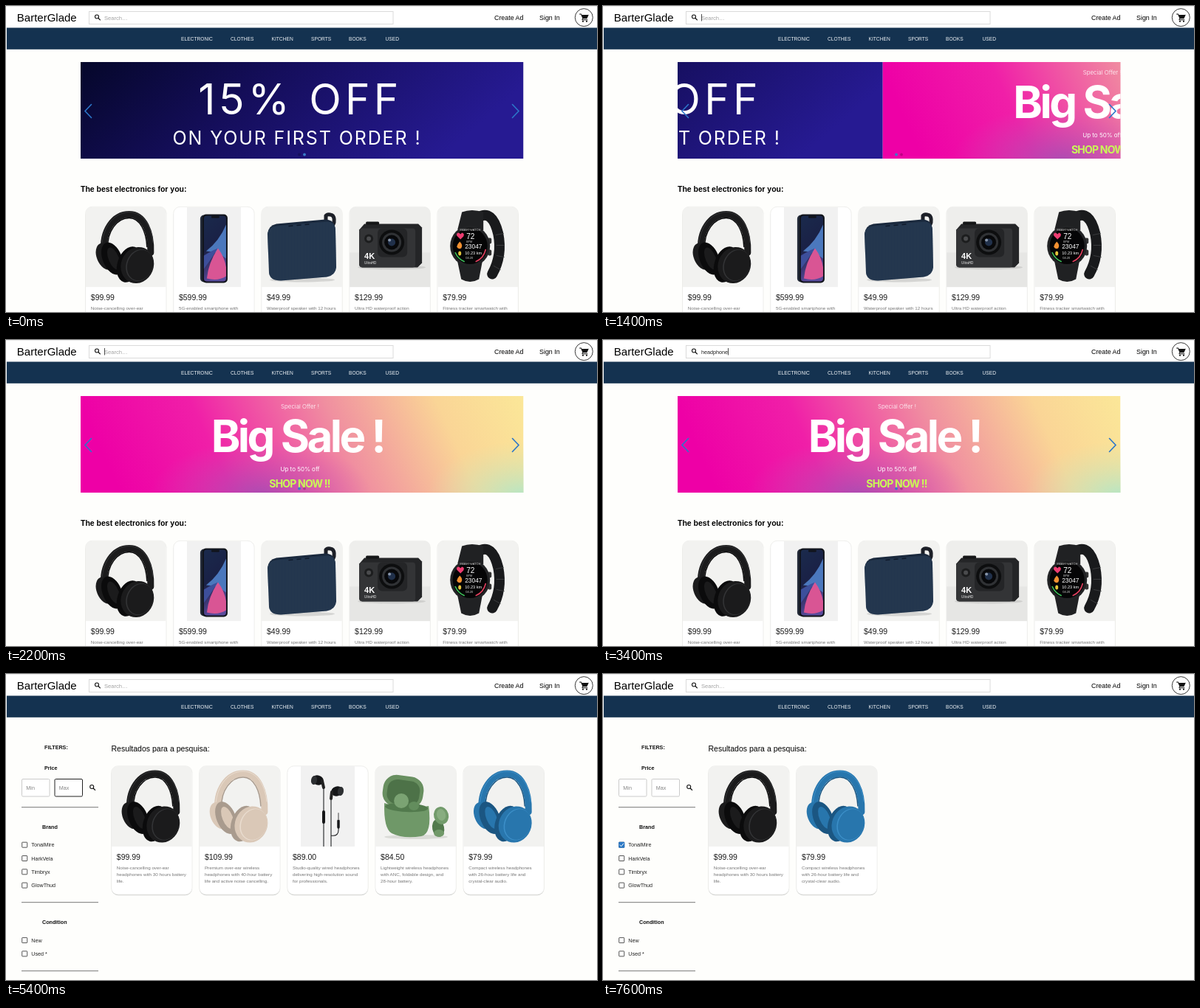
These frames come from a looping animation (800 px wide and 415 px high, 8 s). An HTML page:

```html
<!DOCTYPE html>
<html lang="en">
<head>
<meta charset="utf-8">
<title>BarterGlade</title>
<style>
  html, body { margin: 0; width: 100%; height: 100%; overflow: hidden; background: #fefefc; }
  svg { display: block; font-family: "Liberation Sans", Arial, sans-serif; }
  .banner text { font-family: Inter, sans-serif; fill: #fff; text-anchor: middle; }
  .desc { fill: #777; font-size: 6.25px; }
  .bold { font-weight: bold; }
</style>
</head>
<body>
<svg id="stage" width="800" height="415" viewBox="0 0 800 415"></svg>
<script>
const LOOP = 8000;
const BANNER = 599.5;
const stage = document.getElementById('stage');

// Markup helpers
const text = (x, y, size, str, extra = '') =>
  `<text x="${x}" y="${y}" font-size="${size}" ${extra}>${str}</text>`;
const rect = (x, y, w, h, fill, extra = '') =>
  `<rect x="${x}" y="${y}" width="${w}" height="${h}" fill="${fill}" ${extra}/>`;
const ellipse = (x, y, rx, ry, fill, turn = 0) =>
  `<ellipse cx="${x}" cy="${y}" rx="${rx}" ry="${ry}" fill="${fill}" transform="rotate(${turn} ${x} ${y})"/>`;
const line = (d, stroke, width) =>
  `<path d="${d}" fill="none" stroke="${stroke}" stroke-width="${width}" stroke-linecap="round"/>`;
const shape = (d, fill) => `<path d="${d}" fill="${fill}"/>`;
const group = (id, body) => `<g id="${id}">${body}</g>`;
const gradient = (id, stops, dir) => `<linearGradient id="${id}" ${dir}>` +
  stops.map(([at, color]) => `<stop offset="${at}" stop-color="${color}"/>`).join('') + '</linearGradient>';
const magnifier = (x, y) =>
  `<circle cx="${x - 1}" cy="${y - 1}" r="2.5" fill="none" stroke="#111" stroke-width="1.1"/>` +
  line(`M${x + 1} ${y + 1}l2.4 2.4`, '#111', 1.3);

// Product pictures, each in a 109 x 109 box
const backdrop = rect(0, 0, 109, 109, '#f2f2f0');
const strip = rect(18, 0, 73, 109, '#f1f1f1');

const headphones = (body, dark, light) => backdrop +
  line('M25 62C22 32 38 10 59 10C79 10 89 34 88 62', body, 9) +
  line('M22 58C21 30 37 7 59 7C78 7 89 26 91 48', light, 1) +
  line('M30 55C29 34 42 15 59 15C74 15 82 34 83 54', dark, 1.5) +
  ellipse(27, 67, 12, 19, body, -22) +
  ellipse(36, 70, 13, 23, dark, -22) +
  ellipse(38, 70, 7, 16, body, -22) +
  ellipse(59, 78, 16, 25, dark, 18) +
  ellipse(70, 79, 22, 25, body, 22) +
  ellipse(73, 79, 18, 22, light, 22) +
  ellipse(73.8, 79, 17.2, 21.3, body, 22);

const phone = strip +
  rect(36, 11, 34, 91, '#232a38', 'rx="5"') +
  rect(39, 10, 34, 93, '#10131a', 'rx="5"') +
  rect(41, 12, 30, 89, 'url(#screen)', 'rx="4"') +
  shape('M71 24Q62 46 44 60Q60 60 71 70Z', '#4b78bd') +
  shape('M41 66Q54 58 60 56Q50 72 41 84Z', '#3d4f9b') +
  shape('M60 56Q69 68 71 82V94Q60 101 45 97Q47 76 60 56Z', '#d95594') +
  rect(51, 12, 11, 3, '#10131a', 'rx="1.5"');

const speakerFront = 'M8 37Q9 27 20 26L88 20Q99 20 100 31L101 82Q100 93 88 95L26 100Q11 100 10 89Z';
const speaker = backdrop +
  line('M87 20L87 12Q89 9 95 11Q99 13 98 21L96 26', '#1c1f27', 5) +
  ellipse(55, 99, 44, 3, '#d5d5d3') +
  shape('M8 37Q9 25 20 23L86 17Q99 17 100 31L50 50Z', '#1a293d') +
  shape(speakerFront, '#263a52') + shape(speakerFront, 'url(#mesh)') +
  line('M37 26l5 -.5M48 25l5 -.5M59 24l5 -.5', '#0f1a2b', 1.4);

const camera = rect(0, 0, 109, 109, '#eeeeec') + rect(0, 62, 109, 47, '#e6e6e4') +
  ellipse(57, 82, 46, 3, '#cfcfcd') +
  shape('M13 31L20 23H93L98 28V76L92 82H17L13 79Z', '#242527') +
  rect(13, 29, 76, 53, '#333436', 'rx="4"') +
  rect(22, 20, 18, 4, '#151617', 'rx="1.5"') +
  rect(38, 29, 40, 39, '#242527', 'rx="6"') +
  ellipse(57, 48, 17, 17, '#0d0e0f') + ellipse(57, 48, 13, 13, '#303235') +
  ellipse(57, 48, 10, 10, '#08090b') + ellipse(57, 48, 5, 5, '#20304a') +
  ellipse(54, 45, 2, 2, '#8795aa') +
  ellipse(26, 43, 6, 6, '#1c1d1e') + ellipse(26, 43, 3, 3, '#4a4b4d') +
  text(20, 70, 11, '4K', 'fill="#fff" class="bold"') +
  text(20, 77, 4.6, 'UltraHD', 'fill="#eee"');

const watch = backdrop +
  line('M55 14Q74 3 82 36Q88 66 74 91', '#191a1c', 14) +
  line('M79 38l10 -2M80 52l10 0M80 66l10 2M76 80l9 5', '#3a3b3d', 1) +
  shape('M27 31L33 7Q46 2 62 7L62 32Z', '#202123') +
  shape('M27 74L32 98Q44 105 56 98L61 72Z', '#202123') +
  rect(68, 42, 5, 8, '#333', 'rx="2"') + rect(68, 58, 5, 8, '#333', 'rx="2"') +
  ellipse(44, 53, 27, 28, '#222325') + ellipse(44, 53, 23.5, 24.5, '#050506') +
  line('M24 62A22 23 0 0 0 36 74', '#3ec45b', 1.6) +
  line('M52 74A22 23 0 0 0 65 58', '#e3405f', 1.6) +
  text(44, 32, 4, 'SMARTWATCH', 'fill="#ddd" text-anchor="middle"') +
  text(39, 43, 10, '72', 'fill="#fff"') + text(39, 48, 3.6, 'BPM', 'fill="#ddd"') +
  text(37, 56.5, 8.4, '23047', 'fill="#fff"') + text(37, 64, 5.6, '10.23 km', 'fill="#fff"') +
  text(38, 70, 4, '04.20', 'fill="#ddd"') +
  shape('M31 44L26 39Q25 35 29 35L31 37L33 35Q37 36 35 40Z', '#ee3d72') +
  shape('M30 47Q35 52 32 56Q28 58 26 54Q27 50 30 47Z', '#f39131') +
  ellipse(30, 63, 2, 3, '#e5c63b');

const wired = strip +
  line('M49 25V109M59 40V109M59 94Q70 96 69 84', '#202124', 1.1) +
  line('M69 74V83', '#17181a', 3.5) + line('M69 64V72', '#999', 2) +
  line('M49 62V76', '#151618', 4) +
  [[41, 19], [67, 34]].map(([x, y], i) =>
    ellipse(x, y, 8, 6.5, '#151618', i ? -15 : 15) +
    ellipse(x + (i ? 5 : -5), y, 4, 6, '#2d2f32', 10) +
    line(`M${x + (i ? -7 : 6)} ${y + 1}l${i ? -1 : 2} 9`, '#222', 4)).join('');

const earbuds = backdrop +
  ellipse(55, 96, 43, 3, '#dadbd7') +
  rect(10, 13, 55, 43, '#688f60', 'rx="18" transform="rotate(8 37 34)"') +
  rect(16, 19, 44, 33, '#4d7248', 'rx="13" transform="rotate(8 37 34)"') +
  shape('M12 50Q42 60 72 54Q77 92 62 95Q38 99 22 91Q11 85 12 50Z', '#6f9868') +
  ellipse(42, 56, 29, 6, '#527a4d', 3) +
  ellipse(35, 47, 10, 10, '#7ba373') + ellipse(52, 54, 7, 6, '#638d5d') +
  ellipse(85, 84, 8, 12, '#527a4d', -12) + ellipse(89, 67, 10, 12, '#729b6b', -15) +
  ellipse(89, 66, 6, 8, '#88ad80', -15) + ellipse(86, 91, 7, 5, '#719969');

const black = headphones('#1b1b1c', '#0b0b0c', '#333436');
const sand = headphones('#dac8b7', '#a99b8e', '#e9dccf');
const blue = headphones('#2876ad', '#1b5682', '#3c8fc8');

const card = (x, y, [picture, price, ...lines]) =>
  `<g transform="translate(${x} ${y})">` +
  rect(0, 1.2, 109, 174, '#c9cbc9', 'rx="9"') +
  rect(-.2, -.2, 109.4, 174.4, '#fff', 'rx="9" stroke="#e2e2e0" stroke-width=".6"') +
  `<g clip-path="url(#photo)">${picture}</g>` +
  text(7, 126.5, 10.5, price, 'fill="#1c1c1c"') +
  lines.map((str, i) => text(7, 139.5 + 9 * i, 6.25, str, 'class="desc"')).join('') + '</g>';
const cards = (x, y, list) => list.map((item, i) => card(x + 119.1 * i, y, item)).join('');

const blackItem = [black, '$99.99', 'Noise-cancelling over-ear', 'headphones with 30 hours battery', 'life.'];
const blueItem = [blue, '$79.99', 'Compact wireless headphones', 'with 26-hour battery life and', 'crystal-clear audio.'];
const featured = [
  blackItem,
  [phone, '$599.99', '5G-enabled smartphone with'],
  [speaker, '$49.99', 'Waterproof speaker with 12 hours'],
  [camera, '$129.99', 'Ultra HD waterproof action'],
  [watch, '$79.99', 'Fitness tracker smartwatch with'],
];
const found = [
  blackItem,
  [sand, '$109.99', 'Premium over-ear wireless', 'headphones with 40-hour battery', 'life and active noise cancelling.'],
  [wired, '$89.00', 'Studio-quality wired headphones', 'delivering high-resolution sound', 'for professionals.'],
  [earbuds, '$84.50', 'Lightweight wireless headphones', 'with ANC, foldable design, and', '28-hour battery.'],
  blueItem,
];

const defs = '<defs>' +
  gradient('night', [[0, '#05072a'], [.45, '#150e5c'], [1, '#261a92']], 'x1="0" y1="0" x2="1" y2=".25"') +
  gradient('sunset', [[0, '#ee00a6'], [.25, '#f01fa8'], [.55, '#f08fa0'], [.8, '#fad596'], [1, '#fbe798']], 'x1="0" y1=".1" x2="1" y2="0"') +
  gradient('screen', [[0, '#1a2a4c'], [.5, '#1a2146'], [1, '#5a4b9c']], 'x1="0" y1="0" x2=".3" y2="1"') +
  '<radialGradient id="violet"><stop stop-color="#a050b4" stop-opacity=".85"/><stop offset="1" stop-color="#c850b0" stop-opacity="0"/></radialGradient>' +
  '<radialGradient id="mint"><stop stop-color="#b4e6c6"/><stop offset="1" stop-color="#d8e4b0" stop-opacity="0"/></radialGradient>' +
  '<pattern id="mesh" width="2" height="2" patternUnits="userSpaceOnUse"><rect width="1" height="1" fill="#1c2c42"/></pattern>' +
  `<clipPath id="frame"><rect x="101" y="76" width="${BANNER}" height="131"/></clipPath>` +
  '<clipPath id="photo"><path d="M0 109V9Q0 0 9 0H100Q109 0 109 9V109Z"/></clipPath></defs>';

const header = rect(0, 0, 800, 29.5, '#fff') + rect(0, 0, 800, 1, '#ececec') +
  text(14.8, 21, 15, 'BarterGlade') +
  rect(112.5, 7.5, 411.5, 17, '#fff', 'stroke="#dadada"') + magnifier(124, 15.5) +
  text(133, 18.6, 7.6, 'Search…', 'id="hint" fill="#a2a2a2"') +
  text(133, 18.6, 7.2, '', 'id="query" fill="#222"') +
  rect(133, 11, .8, 9.5, '#222', 'id="caret"') +
  text(661, 19, 8.9, 'Create Ad') + text(722, 19, 8.9, 'Sign In') +
  '<circle cx="782.3" cy="15.6" r="12" fill="#fff" stroke="#222" stroke-width=".9"/>' +
  line('M776.5 11H778.5L781 16.8H786L788 12.3', '#111', 1.1) +
  shape('M778.8 12H788.3L786 16.8H781Z', '#111') + line('M780.8 17L779.8 18.8H787', '#111', 1) +
  ellipse(781, 20.8, 1.1, 1.1, '#111') + ellipse(786, 20.8, 1.1, 1.1, '#111') +
  rect(1, 29.5, 799, 29.3, '#143250') +
  [[237, 'ELECTRONIC'], [304, 'CLOTHES'], [359.5, 'KITCHEN'], [413, 'SPORTS'], [464, 'BOOKS'], [513.5, 'USED']]
    .map(([x, str]) => text(x, 46.6, 6.67, str, 'fill="#eef2f5"')).join('');

const orderSlide = rect(101, 76, BANNER, 131, 'url(#night)') +
  text(398.5, 147, 57, '15% OFF', 'font-weight="400" letter-spacing="5.2"') +
  text(394, 187.8, 25, 'ON YOUR FIRST ORDER !', 'font-weight="400" letter-spacing="1.9"');
const saleSlide = rect(101, 76, BANNER, 131, 'url(#sunset)') +
  ellipse(345, 210, 150, 75, 'url(#violet)') + ellipse(700, 212, 130, 75, 'url(#mint)') +
  text(398, 93, 7.9, 'Special Offer !', 'font-weight="300"') +
  text(394.5, 151.5, 60, 'Big Sale !', 'font-weight="700" letter-spacing="-3.5"') +
  text(398, 178, 8, 'Up to 50% off') +
  text(397.5, 200.3, 14, 'SHOP NOW !!', 'font-weight="700" letter-spacing="-.8" style="fill:#c9fb55"');

const home = `<g class="banner" clip-path="url(#frame)">${group('order', orderSlide)}${group('sale', saleSlide)}</g>` +
  line('M115.5 133.5L107 142.5L115.5 151.5M685.5 133.5L694 142.5L685.5 151.5', '#2b76c9', 1.6) +
  '<circle cx="397" cy="201.5" r="1.9"/><circle cx="404" cy="201.5" r="1.9"/>' +
  text(101, 252, 10.5, 'The best electronics for you:', 'class="bold"') +
  cards(107.8, 272.5, featured);

const field = (x, str, id) => rect(x, 142.5, 37.5, 23.5, '#fff', `id="${id}" rx="1.5" stroke="#cbcbcb"`) +
  text(x + 5.8, 157, 7.2, str, 'fill="#858585"');
const option = (y, str) => rect(21.7, y - 3.6, 7, 7, '#fff', 'rx=".5" stroke="#555" stroke-width="1"') +
  text(34.3, y + 2.6, 7.2, str, 'fill="#222"');
const title = (x, y, str) => text(x, y, 7.2, str, 'class="bold" fill="#111"');

const results = title(52, 101.5, 'FILTERS:') + title(52, 129.5, 'Price') +
  field(21.5, 'Min', 'min') + field(66, 'Max', 'max') + magnifier(117.2, 154) +
  [180.7, 309.7, 402.7].map(y => rect(21, y - .5, 104, 1, '#777')).join('') +
  title(49, 209.7, 'Brand') +
  ['TonalMire', 'HarkVela', 'Timbryx', 'GlowThud'].map((str, i) => option(231.8 + 18.3 * i, str)).join('') +
  group('tick', rect(21.2, 227.8, 8, 8, '#2b78c5', 'rx=".8"') + line('M22.8 231.9L24.6 233.7L27.8 229.9', '#fff', 1)) +
  title(49, 339, 'Condition') + option(361.2, 'New') + option(379.5, 'Used *') +
  text(142.5, 104.5, 10.5, 'Resultados para a pesquisa:') +
  group('all', cards(142.8, 125, found)) + group('filtered', cards(142.8, 125, [blackItem, blueItem]));

stage.innerHTML = defs + rect(0, 0, 800, 415, '#fefefc') + group('home', home) + group('results', results) + header;

const el = id => document.getElementById(id);
const show = (id, on) => el(id).setAttribute('display', on ? 'inline' : 'none');
const dots = el('home').querySelectorAll(':scope > circle');

// The CSS "ease" curve, cubic-bezier(.25, .1, .25, 1)
function ease(p) {
  if (p <= 0 || p >= 1) return p <= 0 ? 0 : 1;
  const curve = (s, a, b) => 3 * s * (1 - s) * ((1 - s) * a + s * b) + s ** 3;
  let low = 0, high = 1;
  for (let i = 0; i < 20; i++) {
    const mid = (low + high) / 2;
    if (curve(mid, .25, .25) < p) low = mid; else high = mid;
  }
  return curve(low, .1, 1);
}

const keys = [[2900, 2], [3000, 3], [3100, 5], [3200, 7], [3400, 9], [3600, 10]];

function draw(t) {
  const searching = t < 3700;
  show('home', searching);
  show('results', !searching);

  const slide = BANNER * ease((t - 1297) / 330);
  el('order').setAttribute('transform', `translate(${-slide} 0)`);
  el('sale').setAttribute('transform', `translate(${BANNER - slide} 0)`);
  const active = t < 1300 ? 1 : 0;
  dots.forEach((dot, i) => {
    dot.setAttribute('fill', i === active ? '#3a7bc8' : '#000');
    dot.setAttribute('fill-opacity', i === active ? 1 : .2);
  });

  const typed = searching ? keys.reduce((n, [at, count]) => t >= at ? count : n, 0) : 0;
  el('query').textContent = 'headphones'.slice(0, typed);
  show('hint', !typed);
  show('caret', searching && t >= 1000 && (typed || (t - 1000) % 1200 <= 600));
  el('caret').setAttribute('x', 133 + (typed ? el('query').getComputedTextLength() : 0));

  el('max').setAttribute('stroke', t >= 5400 && t < 5500 ? '#222' : '#cbcbcb');
  show('tick', t >= 6500);
  show('all', t < 6600);
  show('filtered', t >= 6600);
}

// The screen refreshes ten times a second
function tick() {
  draw(Math.floor(performance.now() % LOOP / 100) * 100);
  requestAnimationFrame(tick);
}
tick();
</script>
</body>
</html>
```
